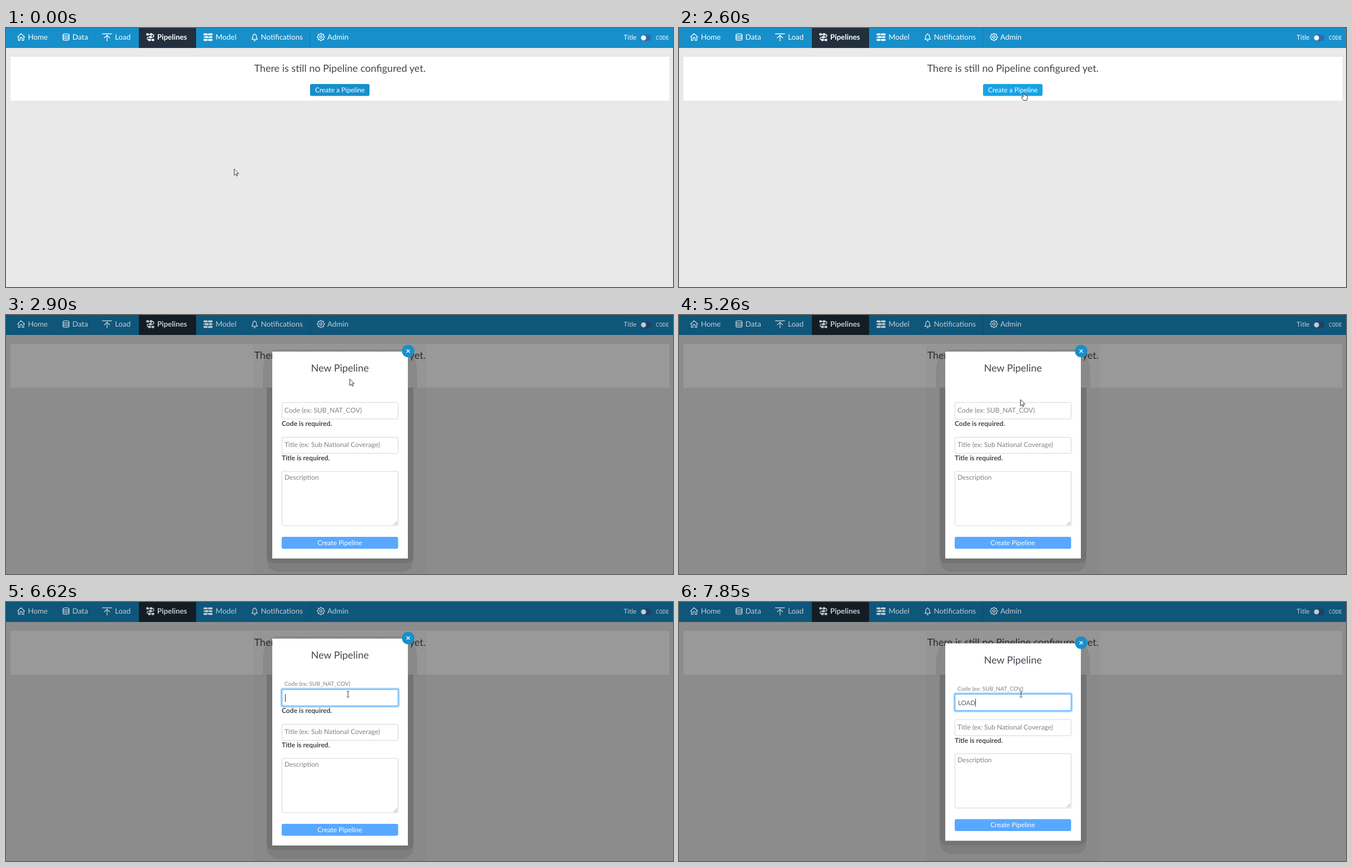
Write an HTML page that moves like this. It is 1200 by 467 pixels and loops after 8000 ms.

```html
<!DOCTYPE html>
<html lang="en">
<head>
<meta charset="utf-8">
<title>New Pipeline</title>
<style>
html, body { margin: 0; height: 100%; overflow: hidden; background: #e9e9e9; }
svg { display: block; width: 100%; height: 100%; }
text { font-family: Lato, sans-serif; font-size: 12.1px; text-rendering: geometricPrecision; white-space: pre; }
.nav { color: #fff; }
.open .nav { color: #c3ccd1; }
.nav text { font-size: 13.4px; fill: currentColor; }
.nav path, .nav circle { fill: none; stroke: currentColor; stroke-width: 1.3; stroke-linejoin: round; }
.nav .solid { fill: currentColor; stroke: none; }
.heading { font-size: 18px; fill: #42484f; }
.strong { font-weight: bold; fill: #42474d; }
.hint { fill: #828282; }
.field { fill: #fff; stroke: #d3d6d9; }
.white { fill: #fff; }
.mid { text-anchor: middle; }
</style>
</head>
<body>
<svg id="stage" viewBox="0 0 1200 467" preserveAspectRatio="none">
  <rect width="1200" height="467" fill="#e9e9e9"/>
  <rect width="1200" height="36" fill="#178fca"/>
  <rect x="239" width="103" height="36" fill="#22303e"/>
  <path d="M546.5 0V36" stroke="#137db2"/>
  <rect x="1142" y="12" width="19" height="11.5" rx="5.7" fill="#3568ab"/>
  <rect x="8" y="52" width="1185.5" height="79" fill="#fff"/>
  <text class="heading mid" x="600.7" y="79">There is still no Pipeline configured yet.</text>
  <rect id="create" x="547" y="101" width="107" height="21.5" rx="3"/>
  <text class="white mid" x="600.7" y="115.5">Create a Pipeline</text>

  <rect id="overlay" width="1200" height="467" opacity=".4"/>

  <g class="nav">
    <path d="M20.5 16.5L27 10.2L33.8 16.5M22.3 15.5V22.3H25.2V18Q27.1 16 29 18V22.3H32V15.5"/>
    <text x="39.5" y="21.3">Home</text>
    <path d="M102.5 12.3C102.5 9.8 113.5 9.8 113.5 12.3S102.5 14.8 102.5 12.3V20.5C102.5 23 113.5 23 113.5 20.5V12.3M102.5 15C102.5 17.5 113.5 17.5 113.5 15M102.5 17.8C102.5 20.3 113.5 20.3 113.5 17.8"/>
    <text x="119.5" y="21.3">Data</text>
    <path d="M173 10.5H190.5M181.8 24V13M176.5 18.3L181.8 13L187 18.3"/>
    <text x="196" y="21.3">Load</text>
    <path d="M254 11.5H263Q266 11.5 266 14T263 16.5H257Q254 16.5 254 19T257 21.5H266"/>
    <path class="solid" d="M252.5 9.5H256.5V13.5H252.5zM259 9.5H263V13.5H259zM258 14.5H262V18.5H258zM256 19.5H260V23.5H256zM262.5 19.5H266.5V23.5H262.5z"/>
    <text x="272" y="21.3" font-weight="bold">Pipelines</text>
    <path d="M355 11.5H372M355 16.5H372M355 21.5H372"/>
    <path class="solid" d="M356 9.8H362V13.2H356zM364 9.8H371V13.2H364zM358 14.8H364V18.2H358zM366 14.8H370V18.2H366zM356 19.8H362V23.2H356zM364 19.8H371V23.2H364z"/>
    <text x="377" y="21.3">Model</text>
    <path d="M442.3 20.3Q444 18.8 444 15.5Q444 11.6 447.3 11.4Q450.6 11.6 450.6 15.5Q450.6 18.8 452.3 20.3zM447.3 11.4V9.8M445.8 22Q447.3 24 448.8 22"/>
    <text x="458.5" y="21.3">Notifications</text>
    <circle cx="566.5" cy="16.3" r="2.1"/>
    <path id="gear"/>
    <text x="578" y="21.3">Admin</text>
    <text x="1111" y="21" style="font-size:12px">Title</text>
    <circle class="solid" cx="1147" cy="17.8" r="4.6"/>
    <text x="1169" y="21" style="font:500 10px 'Noto Sans Mono',monospace">CODE</text>
  </g>

  <g id="dialog">
    <g id="earlyShadow" opacity=".14">
      <path d="M474 131V122q0-44 24-44H704q24 0 24 44V131z"/>
      <path d="M481 131H722V424q0 22-22 22H503q-22 0-22-22z"/>
    </g>
    <g id="shadow">
      <rect x="445" y="53" width="312" height="414" opacity=".025"/>
      <path id="shadowTop" opacity=".08"/>
      <path id="shadowOuter" opacity=".08"/>
      <path id="shadowInner" opacity=".09"/>
    </g>
    <g id="modal">
      <rect id="card" x="479" width="244" fill="#fff"/>
      <g id="head">
        <circle cx="723.5" cy="65" r="11.2" fill="#178fca"/>
        <path d="M720.5 62L726.5 68M726.5 62L720.5 68" stroke="#fff" stroke-width="1.3"/>
        <text class="heading mid" x="600.7" y="102">New Pipeline</text>
        <rect id="halo" x="495" y="156" width="212" height="33" rx="3" fill="none" stroke="#b4dcfc" stroke-width="3"/>
        <rect id="code" class="field" x="496.5" y="157.5" width="209" height="30" rx="2"/>
        <text id="label" class="hint" x="501">Code (ex: SUB_NAT_COV)</text>
        <text id="typed" x="502" y="177" fill="#5c6268" style="font-size:11.5px"></text>
        <rect id="caret" y="166" width="1" height="14" fill="#333"/>
      </g>
      <text id="codeError" class="strong" x="496" y="200">Code is required.</text>
      <g id="tail">
        <rect class="field" x="496.5" y="220.5" width="209" height="29" rx="2"/>
        <text class="hint" x="501" y="238">Title (ex: Sub National Coverage)</text>
        <text class="strong" x="496" y="262">Title is required.</text>
        <rect class="field" x="496.5" y="282" width="209" height="98" rx="2"/>
        <path d="M698 378.5L704 372.5M701.5 378.5L704 376" stroke="#777" stroke-width=".9"/>
        <text class="hint" x="501" y="297">Description</text>
        <rect x="496" y="400" width="209.5" height="21.5" rx="3" fill="#59a8ff"/>
        <text class="white mid" x="600.5" y="414.8">Create Pipeline</text>
      </g>
    </g>
  </g>

  <g id="cursor" stroke="#222" stroke-width=".9" stroke-linejoin="round">
    <path id="arrow" fill="#fff" d="M0 0V11.5L2.6 9.1L4.4 13L6.2 12.2L4.5 8.4H8z"/>
    <path id="hand" fill="#fff" d="M.8 9V1.2Q1.8-.6 2.8 1.2V5.6Q4 4.6 4.9 6Q6.2 5.2 6.8 6.8Q8.4 6.4 8.4 8V11.5L7 15H1.4L-2.6 9.8Q-2.6 8-1 8.6z"/>
    <path id="beam" fill="none" d="M-2.3-5H-.8L0-4.3L.8-5H2.3M0-4.3V4.8M-2.3 5.5H-.8L0 4.8L.8 5.5H2.3"/>
  </g>
</svg>
<script>
const LOOP = 8000;
const $ = id => document.getElementById(id);
const set = (id, attrs) => {
  for (const name in attrs) $(id).setAttribute(name, attrs[name]);
};
const show = (id, on) => set(id, { visibility: on ? 'inherit' : 'hidden' });
// value of the last [time, ...values] row already reached
const at = (rows, t) => rows.filter(row => row[0] <= t).pop().slice(1);

const moves = [
  [0, 410.5, 254], [120, 470, 248], [240, 562, 232], [360, 634, 213.5],
  [510, 660, 186], [630, 664.5, 158], [750, 658, 137], [870, 645, 121],
  [990, 629, 117], [1110, 618.5, 115.5], [5260, 614.5, 152.5], [5380, 615.3, 166]
];
const labels = [[0, 176, 12.1], [5530, 163, 11.2], [5650, 152.5, 10.5], [5800, 151, 10.3]];
const typing = [[0, ''], [6890, 'L'], [7290, 'LO'], [7570, 'LOA'], [7850, 'LOAD']];

const gear = Array.from({ length: 32 }, (_, i) => {
  const angle = (i - .5) * Math.PI / 16, r = i % 4 < 2 ? 6.6 : 5.1;
  return [566.5 + r * Math.cos(angle), 16.3 + r * Math.sin(angle)].map(v => v.toFixed(1));
});
set('gear', { d: `M${gear.join('L')}z` });

// lower part of the shadow, rounded at its bottom corners
const skirt = (bottom, r) =>
  `M469 131H733V${bottom - r}q0 ${r}-${r} ${r}H${469 + r}q-${r} 0-${r}-${r}z`;

function draw(t) {
  const open = t >= 2750, settled = t >= 2900, focused = t >= 5530, filled = t >= 6890;
  const shift = filled ? 8.5 : 0;

  $('stage').classList.toggle('open', open);
  show('overlay', open);
  show('dialog', open);
  show('earlyShadow', open && !settled);
  show('shadow', settled);

  set('modal', {
    opacity: settled ? 1 : .78,
    transform: settled ? '' : 'translate(601 253) scale(.94) translate(-601 -252.5)'
  });
  set('card', { y: 66 + shift, height: 373 - 2 * shift });
  set('shadowTop', { d: `M462 131V${108 + shift}q0-46 28-46H712q28 0 28 46V131z` });
  set('shadowOuter', { d: skirt(463 - shift, 24) });
  set('shadowInner', { d: skirt(447 - shift, 14) });
  set('head', { transform: `translate(0 ${shift})` });
  set('tail', { transform: `translate(0 ${-shift})` });
  show('codeError', !filled);

  show('halo', focused);
  set('halo', { opacity: t < 5650 ? .5 : 1 });
  $('code').style.stroke = focused ? '#5fb0f6' : t >= 5380 ? '#b3b3b3' : '';
  $('code').style.strokeWidth = focused ? 1.5 : 1;
  const [labelY, labelSize] = at(labels, t);
  set('label', { y: labelY });
  $('label').style.fontSize = labelSize + 'px';

  const [word] = at(typing, t);
  $('typed').textContent = word;
  show('caret', focused && !(t >= 6090 && t < 6620));
  set('caret', { x: 502 + (word ? $('typed').getComputedTextLength() : 0) });

  const [x, y] = at(moves, t);
  const hover = !open && x > 547 && x < 654 && y > 101 && y < 122;
  const overField = t >= 5380;
  set('create', { fill: t >= 2600 ? '#18a3e4' : hover ? '#189ad8' : '#178fca' });
  set('cursor', { transform: `translate(${x} ${y})` });
  show('hand', hover);
  show('beam', overField);
  show('arrow', !hover && !overField);
}

function tick() {
  draw(performance.now() % LOOP);
  requestAnimationFrame(tick);
}
tick();
</script>
</body>
</html>
```
